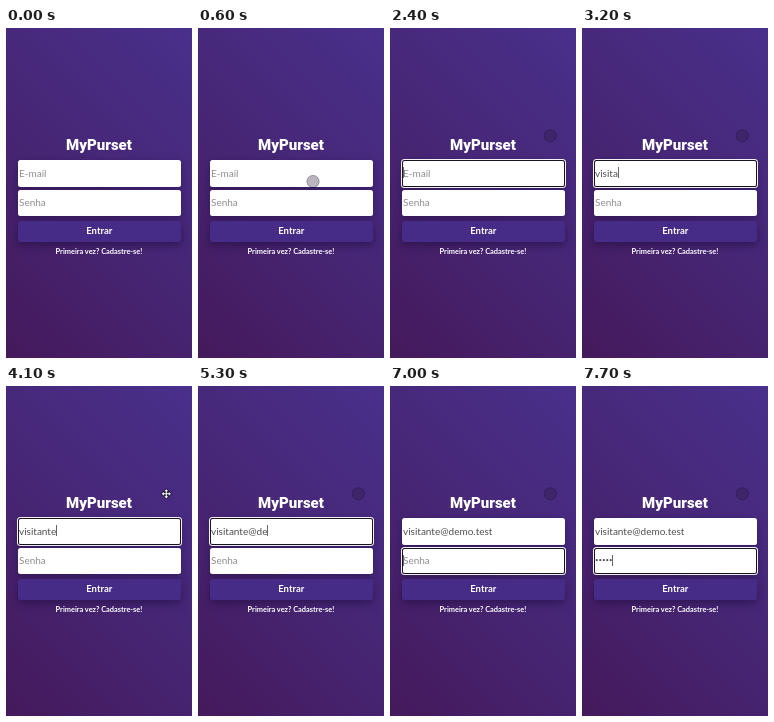
Recreate the animation shown at these times as an HTML page. Size 186 px wide and 330 px high, loop 8000 ms.

```html
<!DOCTYPE html>
<html lang="pt-BR">
<head>
<meta charset="utf-8">
<title>Login</title>
<style>
  html, body { margin: 0; width: 100%; height: 100%; overflow: hidden; }
  body {
    position: relative;
    font: 10px/1 Lato, sans-serif;
    background: linear-gradient(45deg, #45195b 0%, #462573 45%, #49308b 100%);
  }
  .label {
    position: absolute; left: 0; width: 186px;
    text-align: center; white-space: nowrap; color: #fff; font-weight: 700;
  }
  .title { top: 109px; font: 900 15px/16px Roboto, sans-serif; }
  .signup { top: 219px; font-size: 7.4px; line-height: 10px; }
  .field, .button {
    position: absolute; left: 12px; width: 162.5px; border-radius: 2.5px;
  }
  .field {
    --shade: 0 2px 6px rgba(25, 10, 55, .4);
    box-sizing: border-box; height: 26.5px; padding: 0 0 2px 1px;
    display: flex; align-items: center; white-space: pre;
    background: #fff; color: #505050; box-shadow: var(--shade);
  }
  .field.focused { box-shadow: inset 0 0 0 1px #17131f, 0 0 0 1px #f4f2f8, var(--shade); }
  #email { top: 132.3px; }
  #password { top: 161.8px; }
  .caret { width: 1px; height: 11px; margin-right: -1px; background: #666; visibility: hidden; }
  .focused .caret { visibility: visible; }
  .hint { color: #8d8d8d; }
  #password .value { font-size: 6px; }
  .button {
    top: 193px; height: 20.5px; line-height: 20px; text-align: center;
    font-size: 9.5px; font-weight: 700; color: #fff; background: #462b87;
    box-shadow: 0 3px 8px rgba(25, 10, 55, .55);
  }
  #pointer { position: absolute; left: -8px; top: -8px; width: 16px; height: 16px; }
</style>
</head>
<body>
  <div class="label title">MyPurset</div>
  <div class="field" id="email"><span class="value"></span><i class="caret"></i><span class="hint">E-mail</span></div>
  <div class="field" id="password"><span class="value"></span><i class="caret"></i><span class="hint">Senha</span></div>
  <div class="button">Entrar</div>
  <div class="label signup">Primeira vez? Cadastre-se!</div>
  <svg id="pointer" viewBox="-8 -8 16 16">
    <circle id="touch" r="6.1" fill="rgba(45,25,60,.32)" stroke="rgba(25,15,50,.45)" stroke-width=".8"/>
    <g id="pinch" fill="#fff" stroke="#1c1430" stroke-width="1.6" paint-order="stroke" stroke-linejoin="round">
      <path d="M0-4.6 1.9-2.5H.5V-.5H2.5V-1.9L4.6 0 2.5 1.9V.5H.5V2.5H1.9L0 4.6-1.9 2.5H-.5V.5H-2.5V1.9L-4.6 0-2.5-1.9V-.5H-.5V-2.5H-1.9Z"/>
    </g>
  </svg>
<script>
  const LOOP = 8000, STEP = 100;
  const ADDRESS = 'visitante@demo.test';

  // Moments at which each character appears
  const emailKeys = [2600, 2700, 2900, 3000, 3100, 3200, 3400, 3500, 3600,
    4200, 4900, 5300, 5400, 5500, 5700, 5900, 6100, 6300, 6500];
  const passwordKeys = [7200, 7300, 7500, 7600, 7700];
  const emailFocus = 1100, passwordFocus = 6900;

  // time, x, y
  const path = [
    [200, 181, 197], [400, 146, 173], [600, 115, 153.5], [800, 108, 148],
    [1300, 108, 148], [1600, 143, 132], [1800, 157, 113], [2000, 160.3, 107.8]
  ];

  const byId = id => document.getElementById(id);
  const pointer = byId('pointer'), touch = byId('touch'), pinch = byId('pinch');
  const between = (t, from, to) => t >= from && t < to;
  const typed = (keys, t) => keys.filter(key => key <= t).length;

  function pointerAt(t) {
    const next = path.findIndex(point => point[0] > t);
    if (next < 0) return path[path.length - 1].slice(1);
    if (next === 0) return path[0].slice(1);
    const [t0, x0, y0] = path[next - 1], [t1, x1, y1] = path[next];
    const k = (t - t0) / (t1 - t0);
    return [x0 + (x1 - x0) * k, y0 + (y1 - y0) * k];
  }

  function updateField(id, text, focused) {
    const field = byId(id);
    field.querySelector('.value').textContent = text;
    field.querySelector('.hint').hidden = text !== '';
    field.classList.toggle('focused', focused);
  }

  function render(time) {
    const t = Math.floor(time / STEP) * STEP;
    updateField('email', ADDRESS.slice(0, typed(emailKeys, t)), between(t, emailFocus, passwordFocus));
    updateField('password', '•'.repeat(typed(passwordKeys, t)), t >= passwordFocus);

    const [x, y] = pointerAt(t), pinching = between(t, 4100, 4400);
    pointer.style.transform = `translate(${x}px, ${y}px)`;
    pointer.style.visibility = t < path[0][0] ? 'hidden' : 'visible';
    touch.style.display = pinching ? 'none' : '';
    pinch.style.display = pinching ? '' : 'none';
  }

  const start = performance.now();
  function tick() {
    render((performance.now() - start) % LOOP);
    requestAnimationFrame(tick);
  }
  tick();
</script>
</body>
</html>
```
